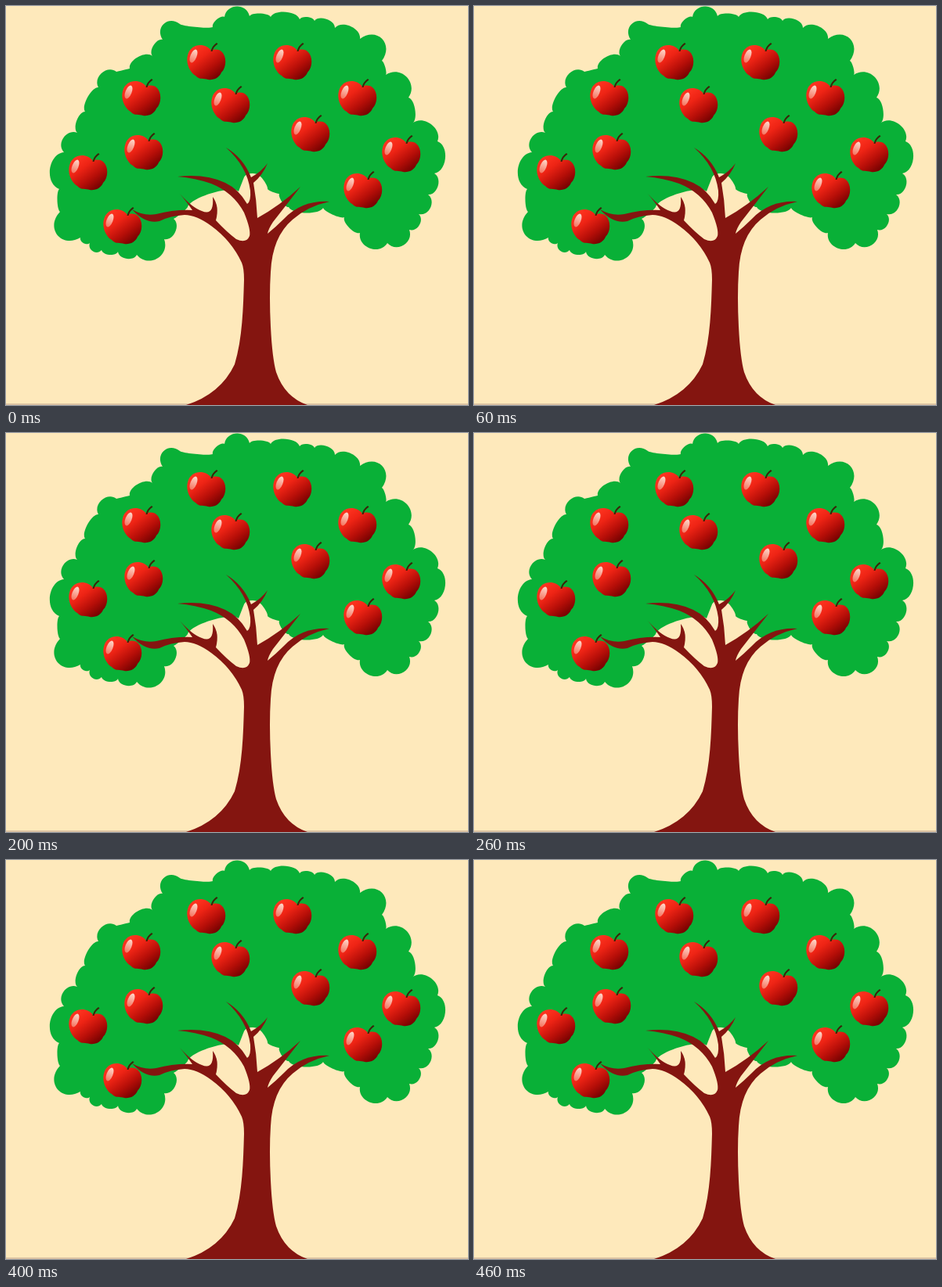
Animation of 590x510 px, one loop 0.5 s. Source, as an HTML page:

```html
<!DOCTYPE html>
<html lang="en">
<head>
<meta charset="utf-8">
<title>Swaying apple tree</title>
<style>
html, body { margin: 0; width: 100%; height: 100%; overflow: hidden; background: #fee9bb; }
svg { display: block; width: 590px; height: 510px; }
.sway { animation: sway .5s step-end infinite; }
.trunk path { fill: #841510; opacity: 0; animation: .5s step-end infinite; }
.trunk .mid { animation-name: mid; }
.trunk .left { animation-name: left; }
.trunk .right { animation-name: right; }
@keyframes sway {
  0%, 40%, 80%, 100% { transform: translate(0, 0) rotate(0deg); }
  20% { transform: translate(-49.7px, 37.8px) rotate(-6.8deg); }
  60% { transform: translate(54.7px, -36.2px) rotate(7.6deg); }
}
@keyframes mid { 0%, 40%, 80%, 100% { opacity: 1; } 20%, 60% { opacity: 0; } }
@keyframes left { 0%, 40%, 100% { opacity: 0; } 20% { opacity: 1; } }
@keyframes right { 0%, 80%, 100% { opacity: 0; } 60% { opacity: 1; } }
</style>
</head>
<body>
<svg viewBox="0 0 590 510">
  <defs>
    <linearGradient id="skin" x1=".15" y1=".1" x2=".85" y2=".95">
      <stop offset="0" stop-color="#ff3420"/>
      <stop offset=".3" stop-color="#ee2415"/>
      <stop offset=".65" stop-color="#b50e08"/>
      <stop offset="1" stop-color="#6b0000"/>
    </linearGradient>
    <linearGradient id="shine" x1="0" y1="0" x2="0" y2="1">
      <stop offset="0" stop-color="#ffd9cc"/>
      <stop offset="1" stop-color="#f4735f"/>
    </linearGradient>
    <g id="apple">
      <path fill="url(#skin)" d="M6,-15 C-1,-25 -20,-25 -24,-9 C-27,2 -20,14 -14,17 C-9,23 -3,20 2,22 C9,23 16,20 19,13 C26,6 26,-8 19,-14 C15,-17 10,-17 6,-15Z"/>
      <ellipse fill="url(#shine)" cx="-16.5" cy="-8" rx="4" ry="9" transform="rotate(22 -16.5 -8)"/>
      <path fill="#3b2408" d="M5.5,-14 Q7,-21 13,-25 L14.5,-23.5 Q9,-20 7.5,-14Z"/>
    </g>
  </defs>
  <rect width="590" height="510" fill="#fee9bb"/>
  <rect y="508" width="590" height="2" fill="#dcc3a3"/>
  <path id="crown" class="sway" fill="#09b037"/>
  <g class="trunk">
    <path class="mid" d="M230,510 Q274,496 292,458 C302,425 303,385 304,350 Q304,335 301,328 Q288,300 262,281 Q243,267 228,267
      Q210,268 196,275 Q178,279 161,260 Q176,269 192,266 Q215,260 238,261 Q232,252 222,240 Q238,258 250,262 Q266,269 264,244
      Q273,256 268,274 Q282,289 294,298 Q307,304 311,294 Q313,286 304,264 Q290,238 262,227 Q242,220 219,218 Q255,214 280,226
      Q297,234 308,253 Q313,250 312,236 Q308,205 281,181 Q303,194 313,219 Q326,212 334,201 Q328,216 316,226 Q320,248 321,271
      Q350,255 376,231 Q352,262 341,276 Q335,285 334,291 Q345,282 355,272 Q378,248 413,250 Q385,256 366,273 Q340,295 338,340
      Q336,370 338,410 Q340,450 345,468 Q356,500 385,510Z"/>
    <path class="left" d="M230,510 Q270,498 280,460 Q281,410 270,352 Q267,324 259,315 Q246,297 226,279 Q212,265 200,266
      Q186,269 176,277 Q157,287 154,263 Q160,273 168,270 Q182,258 204,257 Q200,250 190,238 Q204,250 213,255 Q224,252 221,233
      Q227,245 222,264 Q232,277 248,283 Q262,287 264,276 Q266,258 248,236 Q234,214 191,215 Q232,203 250,218 Q257,224 263,234
      Q267,228 264,205 Q262,180 252,165 Q264,172 268,194 Q280,188 290,175 Q283,191 269,200 Q269,225 274,249 Q298,232 326,202
      Q308,228 297,245 Q288,258 289,269 Q298,262 304,253 Q328,218 366,227 Q335,228 316,249 Q300,264 299,295 Q298,318 305,350
      Q313,390 324,435 Q334,485 385,510Z"/>
    <path class="right" d="M230,510 Q270,498 298,458 Q318,420 328,372 Q338,335 335,323 Q322,292 291,272 Q277,263 263,263
      Q243,262 228,269 Q206,276 209,254 Q213,266 226,261 Q248,252 272,255 Q270,246 260,234 Q274,250 290,257 Q304,256 302,237
      Q309,246 304,267 Q313,281 332,290 Q350,294 352,282 Q354,258 332,235 Q312,213 264,211 Q310,207 332,224 Q342,231 351,245
      Q355,240 353,229 Q346,203 311,176 Q340,188 355,211 Q366,205 371,195 Q367,208 357,217 Q366,240 367,262 Q392,250 416,228
      Q396,253 384,267 Q376,277 377,283 Q384,278 390,271 Q412,246 437,253 Q418,255 402,270 Q379,288 370,325 Q358,368 350,415
      Q346,450 348,470 Q354,500 385,510Z"/>
  </g>
  <g class="sway">
    <use href="#apple" x="256" y="72"/>
    <use href="#apple" x="366" y="72"/>
    <use href="#apple" x="173" y="118"/>
    <use href="#apple" x="287" y="127"/>
    <use href="#apple" x="449" y="118"/>
    <use href="#apple" x="389" y="164"/>
    <use href="#apple" x="176" y="187"/>
    <use href="#apple" x="105" y="213"/>
    <use href="#apple" x="505" y="190"/>
    <use href="#apple" x="456" y="236"/>
    <use href="#apple" x="149" y="282"/>
  </g>
</svg>
<script>
// Clockwise lobes of the crown: end point and outward bulge.
const lobes = [
  [311, 13, 13], [338, 14, 4], [375, 17, 8], [394, 19, 4], [420, 28, 7], [452, 42, 10],
  [480, 70, 20], [485, 88, 2], [514, 117, 17], [519, 150, 6], [551, 173, 13], [547, 214, 12],
  [539, 241, 9], [527, 266, 10], [515, 286, 8], [487, 303, 13], [452, 290, 14], [432, 270, 5],
  [405, 258, 3], [361, 257, 7], [349, 240, 3], [334, 234, 1], [323, 217, -2], [304, 219, -4],
  [297, 237, 0], [232, 257, -8], [214, 272, 1], [202, 298, 9], [167, 318, 17], [143, 314, 7],
  [122, 312, 5], [107, 303, 7], [95, 296, 4], [69, 263, 21], [68, 234, 3], [74, 187, 15],
  [91, 162, 11], [101, 135, 6], [118, 104, 6], [141, 84, 11], [158, 80, 0], [187, 64, 8],
  [200, 43, 6], [222, 23, 14], [264, 27, -2], [279, 14, 4]
];

function outline(list) {
  let [x, y] = list[list.length - 1];
  let d = `M${x},${y}`;
  for (const [ex, ey, bulge] of list) {
    const dx = ex - x, dy = ey - y;
    const k = bulge * 4 / 3 / Math.hypot(dx, dy);
    const at = t => `${x + dx * t + dy * k},${y + dy * t - dx * k}`;
    d += `C${at(.1)} ${at(.9)} ${ex},${ey}`;
    x = ex;
    y = ey;
  }
  return d + "Z";
}

document.getElementById("crown").setAttribute("d", outline(lobes));
</script>
</body>
</html>
```
